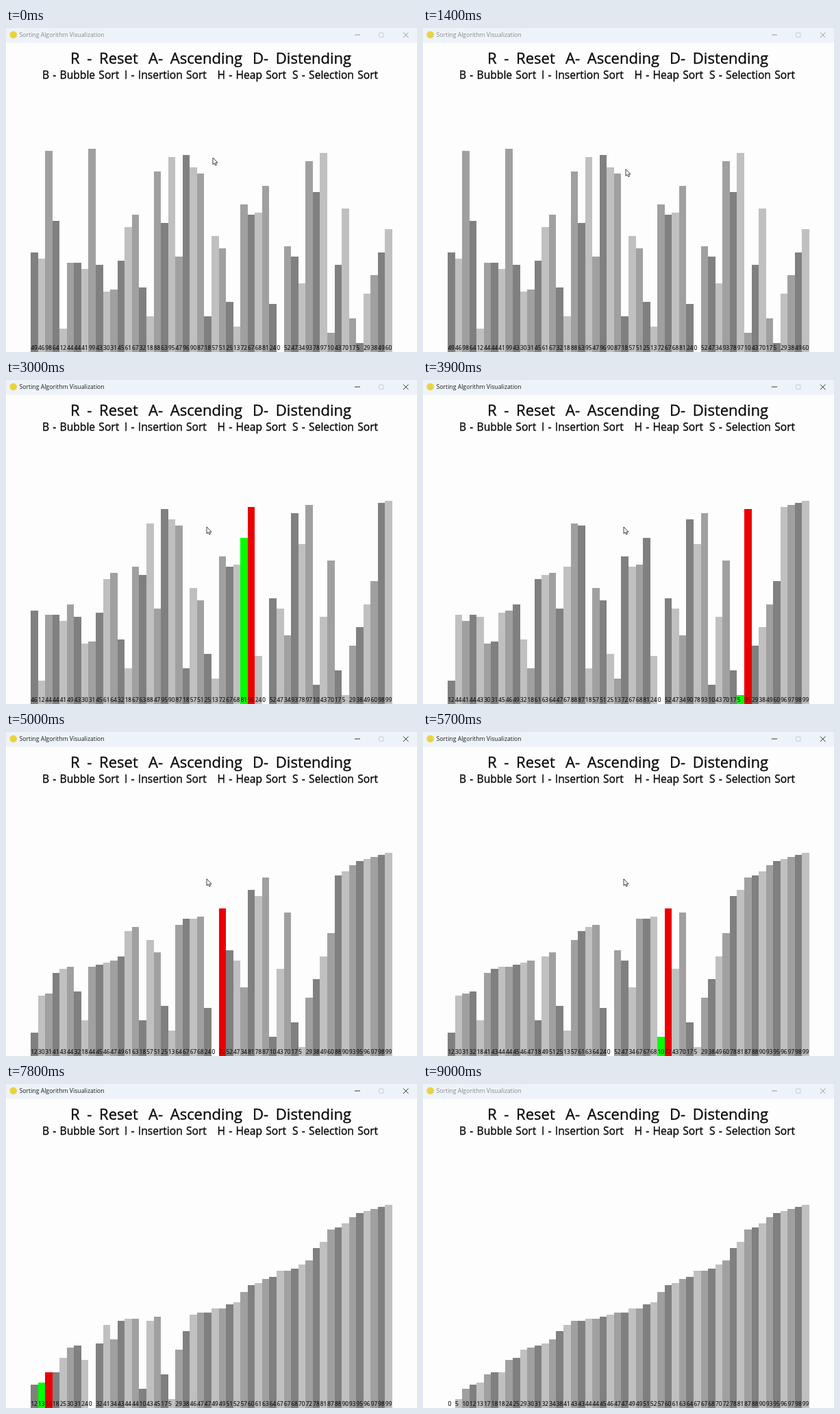
Write an HTML page that moves like this. It is 600 by 472 pixels and loops after 9100 ms.

```html
<!DOCTYPE html>
<html lang="en">
<head>
<meta charset="utf-8">
<title>Sorting Algorithm Visualization</title>
<style>
  html, body { margin: 0; width: 100%; height: 100%; overflow: hidden; background: #fefdfe; }
  svg { display: block; font-family: "Open Sans", "Noto Sans", sans-serif; }
  .caption { font-size: 8.7px; fill: #888; }
  .control { fill: none; stroke: #888; stroke-width: .9; }
  .disabled { fill: none; stroke: #c4c7cc; stroke-width: .9; }
  .active .caption { fill: #191919; }
  .active .control { stroke: #222; }
  .heading { fill: #0a0a0a; stroke: #0a0a0a; stroke-width: .35; }
  .large { font-size: 22px; word-spacing: 5px; }
  .small { font-size: 15.6px; word-spacing: 1.2px; }
  #bars { shape-rendering: crispEdges; }
  #labels { font-size: 8.2px; fill: #0c0c0c; stroke: #0c0c0c; stroke-width: .15; }
</style>
</head>
<body>
<svg id="stage" width="600" height="472" viewBox="0 0 600 472">
  <rect width="600" height="21.5" fill="#eef3fa"/>
  <circle cx="10.7" cy="9.8" r="5.4" fill="#ead33f"/>
  <text class="caption" x="19.5" y="13.2">Sorting Algorithm Visualization</text>
  <path class="control" d="M509 10h8M580 6.5l7.5 7.5m0-7.5l-7.5 7.5"/>
  <rect class="disabled" x="544.5" y="7" width="6.5" height="6.5" rx="1"/>
  <g class="heading large">
    <text x="94" y="52">R - Reset</text>
    <text x="208" y="52">A- Ascending</text>
    <text x="360" y="52">D- Distending</text>
  </g>
  <g class="heading small">
    <text x="53" y="73.5">B - Bubble Sort</text>
    <text x="173" y="73.5">I - Insertion Sort</text>
    <text x="308.5" y="73.5">H - Heap Sort</text>
    <text x="418" y="73.5">S - Selection Sort</text>
  </g>
  <g id="bars"></g>
  <g id="labels"></g>
  <path id="cursor" d="M0 0v9.8l2.3-2 1.5 3.3 1.6-.7-1.4-3.2h3z" fill="#fff" stroke="#111" stroke-width=".8"/>
</svg>
<script>
const LOOP = 9100, TICK = 100;
const LEFT = 36, BAR = 10.56, BASE = 474.5, UNIT = 3.017;
const GREYS = ['#808080', '#c0c0c0', '#a0a0a0'];
const GREEN = '#00ff00', RED = '#ea0000';
const FOCUS = 1500, SORT = 1775, CURSOR_GONE = 6800, BLUR = 8900;

// The unsorted list, as labelled under the bars
const values = [
  49, 46, 98, 64, 12, 44, 44, 41, 99, 43, 30, 31, 45, 61, 67, 32, 18,
  88, 63, 95, 47, 96, 90, 87, 18, 57, 51, 25, 13, 72, 67, 68, 81, 24,
  0, 52, 47, 34, 93, 78, 97, 10, 43, 70, 17, 5, 29, 38, 49, 60
];

const $ = id => document.getElementById(id);
const stage = $('stage'), cursor = $('cursor');

function add(tag, parent, attrs) {
  const node = document.createElementNS('http://www.w3.org/2000/svg', tag);
  for (const key in attrs) node.setAttribute(key, attrs[key]);
  return parent.appendChild(node);
}

// 0 before from, 1 after to, linear between
const ramp = (t, from, to) => Math.min(1, Math.max(0, (t - from) / (to - from)));

// Swaps done: a nearly steady rate that rises a little
function swapCount(t) {
  const s = Math.max(0, t - SORT) / 1000;
  return Math.floor(94.5 * s + .16 * s * s);
}

// Bubble sort stopped after a number of swaps; low is the last swapped index
function sortUpTo(limit) {
  const list = values.slice();
  let done = 0, low = -1;
  for (let end = list.length - 1; end > 0; end--) {
    for (let j = 0; j < end; j++) {
      if (list[j] <= list[j + 1]) continue;
      if (done === limit) return { list, low };
      [list[j], list[j + 1]] = [list[j + 1], list[j]];
      low = j;
      done++;
    }
  }
  return { list, low: -1 };
}

const bars = values.map((_, i) => add('rect', $('bars'), { x: LEFT + i * BAR, width: BAR }));
const labels = values.map((_, i) => add('text', $('labels'), { x: LEFT + i * BAR + .4, y: 468.6 }));

function draw(t) {
  const { list, low } = sortUpTo(swapCount(t));
  list.forEach((value, i) => {
    const isLow = low >= 0 && i === low;
    const isHigh = low >= 0 && i === low + 1;
    bars[i].setAttribute('y', BASE - value * UNIT);
    bars[i].setAttribute('height', value * UNIT);
    bars[i].setAttribute('fill', isLow ? GREEN : isHigh ? RED : GREYS[i % 3]);
    labels[i].textContent = value;
    labels[i].style.fill = isHigh ? '#700000' : '';
  });

  const enter = ramp(t, 1200, 1500), leave = ramp(t, 6500, 6700);
  const x = 302 - 9 * enter + 25 * leave;
  const y = 189 + 25 * enter - 173 * leave;
  cursor.setAttribute('transform', `translate(${x} ${y})`);
  cursor.setAttribute('visibility', t < CURSOR_GONE ? 'visible' : 'hidden');
  stage.classList.toggle('active', t >= FOCUS && t < BLUR);
}

const start = performance.now();
let shown = -1;
function frame() {
  const t = Math.max(0, performance.now() - start) % LOOP;
  const tick = Math.floor(t / TICK) * TICK;
  if (tick !== shown) draw(shown = tick);
  requestAnimationFrame(frame);
}
frame();
</script>
</body>
</html>
```
